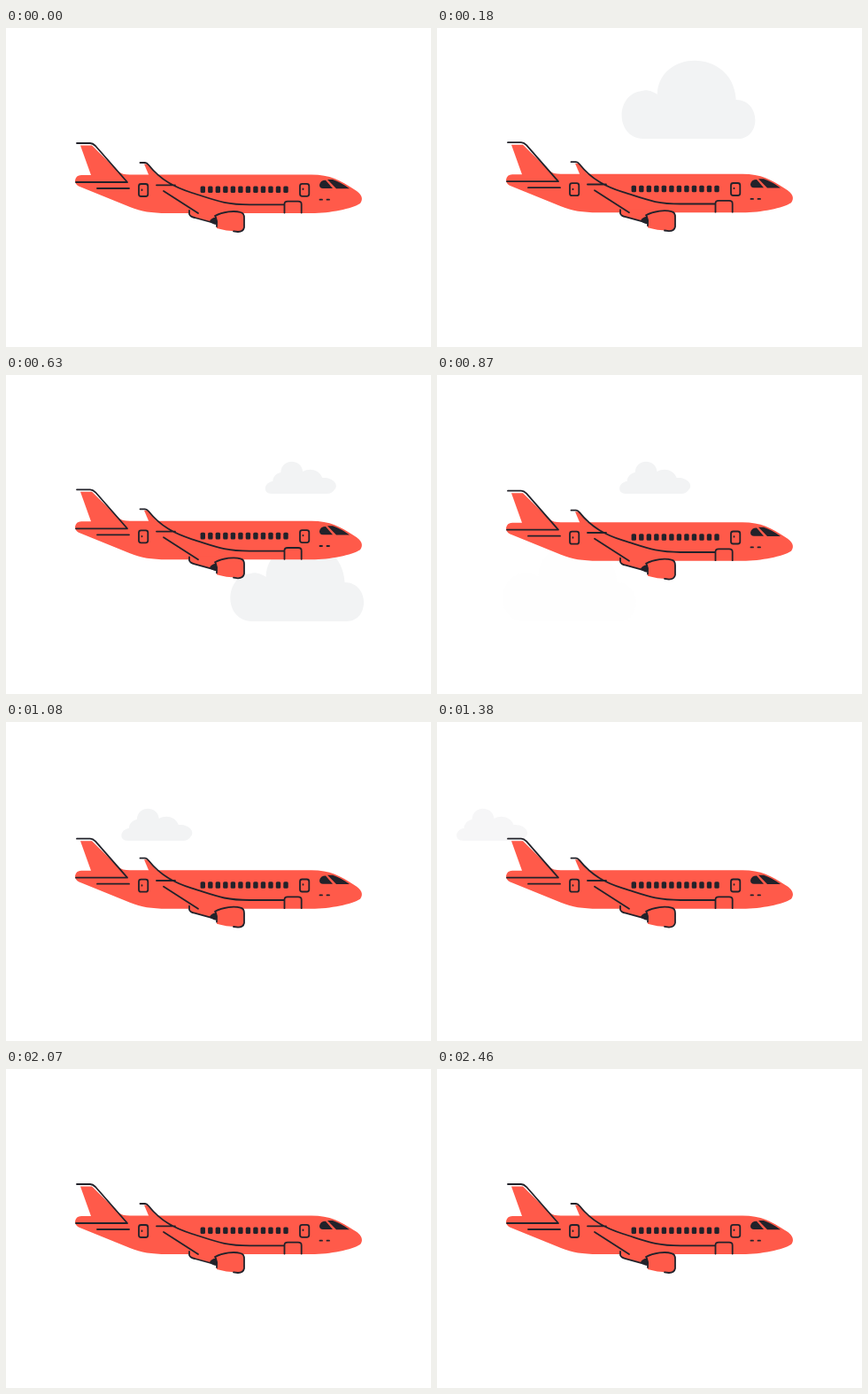
These frames come from a looping animation (480 by 360 pixels, 2.49 s). An HTML page:

```html
<!DOCTYPE html>
<html lang="en">
<head>
<meta charset="utf-8">
<style>
  html, body { margin: 0; width: 100%; height: 100%; overflow: hidden; background: #fff; }
  svg { display: block; width: 100vw; height: 100vh; }
  .cloud { fill: #f2f3f4; }
  .red { fill: #ff5a4a; }
  .dark { fill: #22222a; }
  .line { fill: none; stroke: #22222a; stroke-width: 1.8; stroke-linecap: round; stroke-linejoin: round; }
</style>
</head>
<body>
<svg viewBox="0 0 480 360">
  <defs>
    <path id="big" d="M24 89C-8 88-8 38 23 35C28 33 36 36 40 39C42-13 126-13 129 45C157 45 158 89 131 89Z"/>
    <path id="small" d="M8 36C-3 36-1 23 9 22C9 17 13 13 18 12C19-4 41-4 43 11C50 7 61 8 65 18C77 17 84 26 79 31Q76 36 70 36Z"/>
  </defs>
  <use href="#big" id="high" class="cloud"/>
  <use href="#big" id="low" class="cloud"/>
  <use href="#small" id="far" class="cloud"/>
  <g id="plane">
    <g class="red">
      <path d="M84 132.500H97L127 162Q131 165.500 140 165.500H345C366 165.500 378 172 393 182C402 187 404 193 400 198C391 204 366 209 345 209H182C164 209 153 207 140 202L82 178.500Q78 176 78 172Q79 166 85 166H96Z"/>
      <path d="M156 153.500H160L174 170H163Z"/>
      <path d="M207 205H245L268 208Q269 211 269 215V224Q268 230 262 229.500Q248 229 238 226V220L232 219L213 214Q207 212 207 209Z"/>
    </g>
    <g class="line">
      <path d="M80 130H95Q98 130 101 133L137 174H79M103 181H139"/>
      <path d="M151.500 152H157Q159 152 161 154.500C175 172 191 180 210 186C236 194 246 199.300 275 199.300H314M170 177.300H191M178 184L217 209"/>
      <path d="M314.500 208.500V199Q314.500 195.700 318 195.700H330Q333.700 195.700 333.700 199V208.500"/>
      <path d="M207 206V210Q208 213 213 214L233 219.500M236 212C245 207 258 206 265 208Q269 209 269 214V225Q268 230 262 230L257 229.300M236.500 212Q239 218 238 224"/>
      <rect x="150" y="176" width="10.300" height="14" rx="2.500"/>
      <rect x="332" y="175.800" width="10.300" height="14" rx="2.500"/>
      <path d="M153.500 182.500V183M335.500 181.500V182M354.500 193.700H357M362.500 193.700H365"/>
    </g>
    <g class="dark">
      <path d="M354 177Q355 171.800 361 171.800L369 181H358Q354 181 354 177Z"/>
      <path d="M363 171H369Q379 174.500 388 181.300H373Z"/>
      <path d="M230 218Q232 214 237 213.500Q239 218 237.500 222Q232 221 230 218Z"/>
      <g id="windows"></g>
    </g>
  </g>
</svg>
<script>
const LOOP = 2490;
const el = id => document.getElementById(id);
const clamp = v => Math.max(0, Math.min(1, v));

el('windows').innerHTML = Array.from({ length: 12 }, (_, i) =>
  `<rect x="${219.6 + i * 8.52}" y="178.500" width="5.400" height="7.600" rx="1.500"/>`).join('');

// Each cloud: left edge x at time t0, speed in px/ms, fade-in start and fade-out end.
const clouds = [
  { id: 'high', x: 75, y: 36, t0: 360, speed: 0.747, from: 0, to: 400, fade: 160 },
  { id: 'low', x: 75, y: 189, t0: 870, speed: 0.747, from: 350, to: 890, fade: 170 },
  { id: 'far', x: 206, y: 98, t0: 870, speed: 0.361, from: 340, to: 1520, fade: 200 }
];

// Vertical drift of the plane: [time, offset]
const bob = [[0, 0], [350, -1.5], [1250, 2], [1710, 0.3], [1900, -1.2], [2070, 0], [2250, 0.4], [LOOP, 0]];

function bobAt(t) {
  const i = bob.findIndex(p => p[0] > t);
  const [t0, a] = bob[i - 1], [t1, b] = bob[i];
  return a + (b - a) * (1 - Math.cos(Math.PI * (t - t0) / (t1 - t0))) / 2;
}

function draw(now) {
  const t = now % LOOP;
  for (const c of clouds) {
    const node = el(c.id);
    node.setAttribute('transform', `translate(${c.x - (t - c.t0) * c.speed} ${c.y})`);
    node.setAttribute('opacity', clamp((t - c.from) / c.fade) * clamp((c.to - t) / c.fade));
  }
  el('plane').setAttribute('transform', `translate(0 ${bobAt(t)})`);
}

const start = performance.now();
function tick() {
  draw(performance.now() - start);
  requestAnimationFrame(tick);
}
tick();
</script>
</body>
</html>
```
